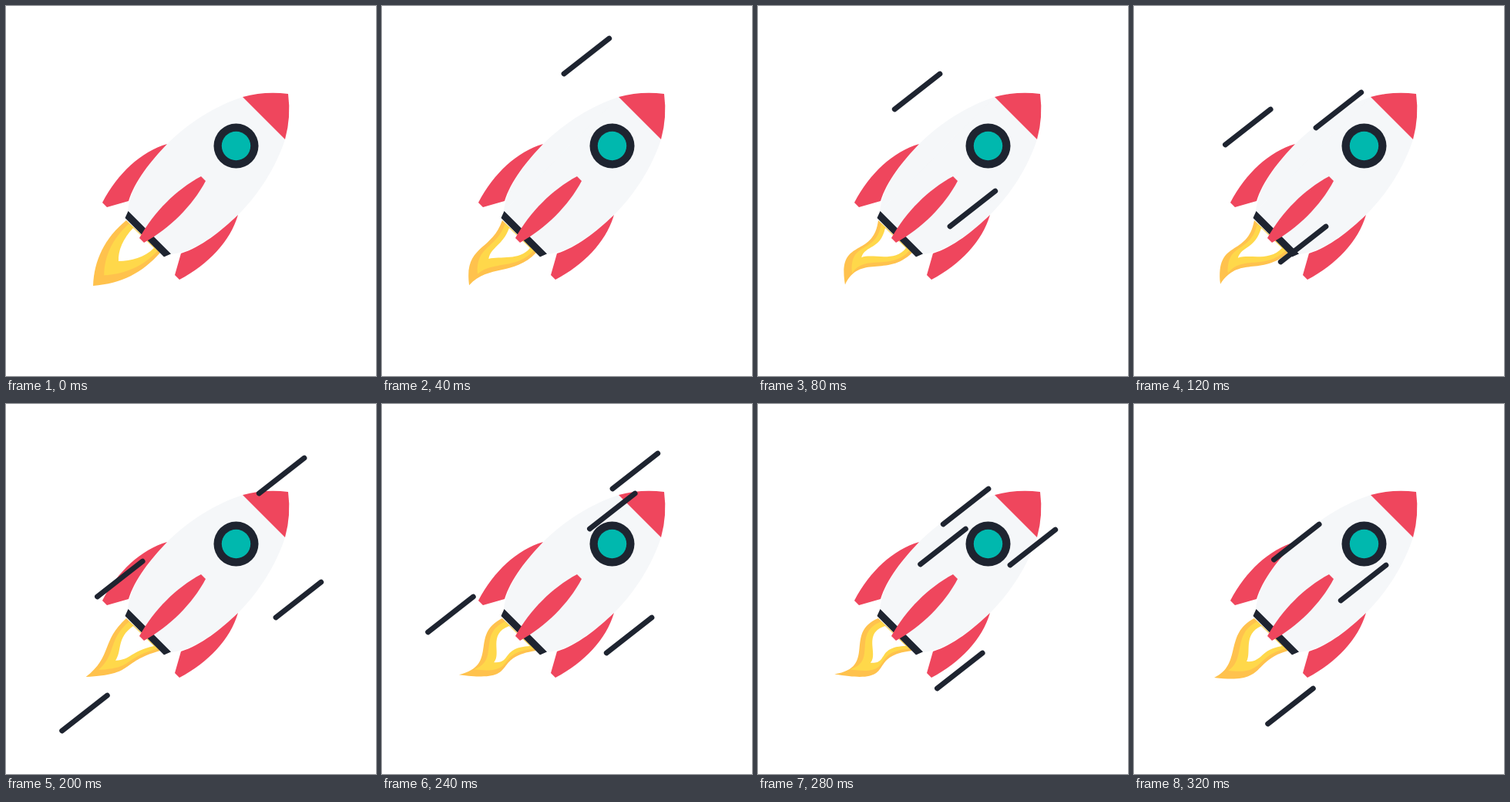
Animation, 480 px wide and 480 px high, one loop 360 ms. Source, as an HTML page:

```html
<!DOCTYPE html>
<html lang="en">
<head>
<meta charset="utf-8">
<title>Rocket</title>
<style>
  html, body { margin: 0; width: 100%; height: 100%; overflow: hidden; background: #fff; }
  svg { display: block; width: 100%; height: 100%; }
  .red { fill: #ef465d; }
  .dark { fill: #1e2430; }
  .shell { fill: #f5f7f9; }
  #streaks { fill: none; stroke: #1e2430; stroke-width: 6.7; stroke-linecap: round; }
</style>
</head>
<body>
<svg viewBox="0 0 480 480">
  <defs>
    <path id="fin" d="M209 179C175 189 145 217 125 255L131 261L159 253C167 227 188 201 209 179Z"/>
    <path id="half" d="M307 118C270 130 235 153 209 179C186 204 161 235 158 266L214 322L362 173Z"/>
  </defs>
  <path id="outer" fill="#ffc24d"/>
  <path id="middle" fill="#ffd84a"/>
  <path id="core" fill="#fff"/>
  <g class="shell">
    <use href="#half"/>
    <use href="#half" transform="matrix(0 -1 -1 0 480 480)"/>
  </g>
  <g class="red">
    <use href="#fin"/>
    <use href="#fin" transform="matrix(0 -1 -1 0 480 480)"/>
    <path d="M307 118Q336 110 366 114Q370 144 362 173Z"/>
  </g>
  <path class="dark" d="M158.5 266L214 321.5L205 325.5L154.5 275Z"/>
  <path class="red" d="M253 221C221 238 192 267 173 301L179 307C213 288 242 259 259 227Z"/>
  <circle class="dark" cx="298.5" cy="181.5" r="29"/>
  <circle cx="298.5" cy="181.5" r="18.7" fill="#00b8ae"/>
  <path id="streaks"/>
</svg>
<script>
  const STEP = 40, FRAMES = 9, LIFE = 4;
  const DX = 58.8, DY = 46;

  // Lower-left end of each streak as it appears; a new one enters every step.
  const streaks = [[236, 88], [249, 286], [236, 158], [387, 70], [350, 277], [299, 110], [327, 209]];

  // Curve points from the left root over the tip to the right root:
  // rest x, rest y, sway across the flame, puff x, puff y.
  const outerShape = [
    [156, 278, 0, 0, 0],
    [130, 313, 20, -2, -12],
    [129, 320, -27, -15, 10],
    [106, 356, 7, 7, 7],
    [160, 343, -28, -10, 17],
    [151, 340, 16, 26, 6],
    [200, 320, 0, 0, 0]
  ];
  const coreShape = [
    [165, 288, 0, 0, 0],
    [147, 307, 12, 5, -6],
    [148, 317, -9, -3, 1],
    [140, 331, -6, 6, 0],
    [159, 329, -11, 3, 2],
    [165, 324, 12, 15, 2],
    [192, 314, 0, 0, 0]
  ];

  const mix = (a, b, k) => a.map(([x, y], i) => [x + (b[i][0] - x) * k, y + (b[i][1] - y) * k]);
  const curve = ([start, ...rest]) => `M${start}C${rest.join(' ')}Z`;
  const setPath = (id, d) => document.getElementById(id).setAttribute('d', d);

  function pose(shape, phase) {
    const wave = Math.sin(phase);
    const puff = Math.cos(phase / 2) ** 16;
    return shape.map(([x, y, sway, px, py]) =>
      [x + sway * wave + px * puff, y + 0.8 * sway * wave + py * puff]);
  }

  function draw(step) {
    const phase = 2 * Math.PI * step / FRAMES;
    const outer = pose(outerShape, phase);
    const core = pose(coreShape, phase);
    setPath('outer', curve(outer));
    setPath('middle', curve(mix(outer, core, 0.43)));
    setPath('core', curve(core));

    setPath('streaks', streaks.map(([x, y], i) => {
      const age = step - 1 - i;
      return age < 0 || age >= LIFE ? '' : `M${x - DX * age} ${y + DY * age}l${DX} ${-DY}`;
    }).join(''));
  }

  function tick() {
    draw(Math.floor(performance.now() / STEP) % FRAMES);
    requestAnimationFrame(tick);
  }
  draw(0);
  requestAnimationFrame(tick);
</script>
</body>
</html>
```
